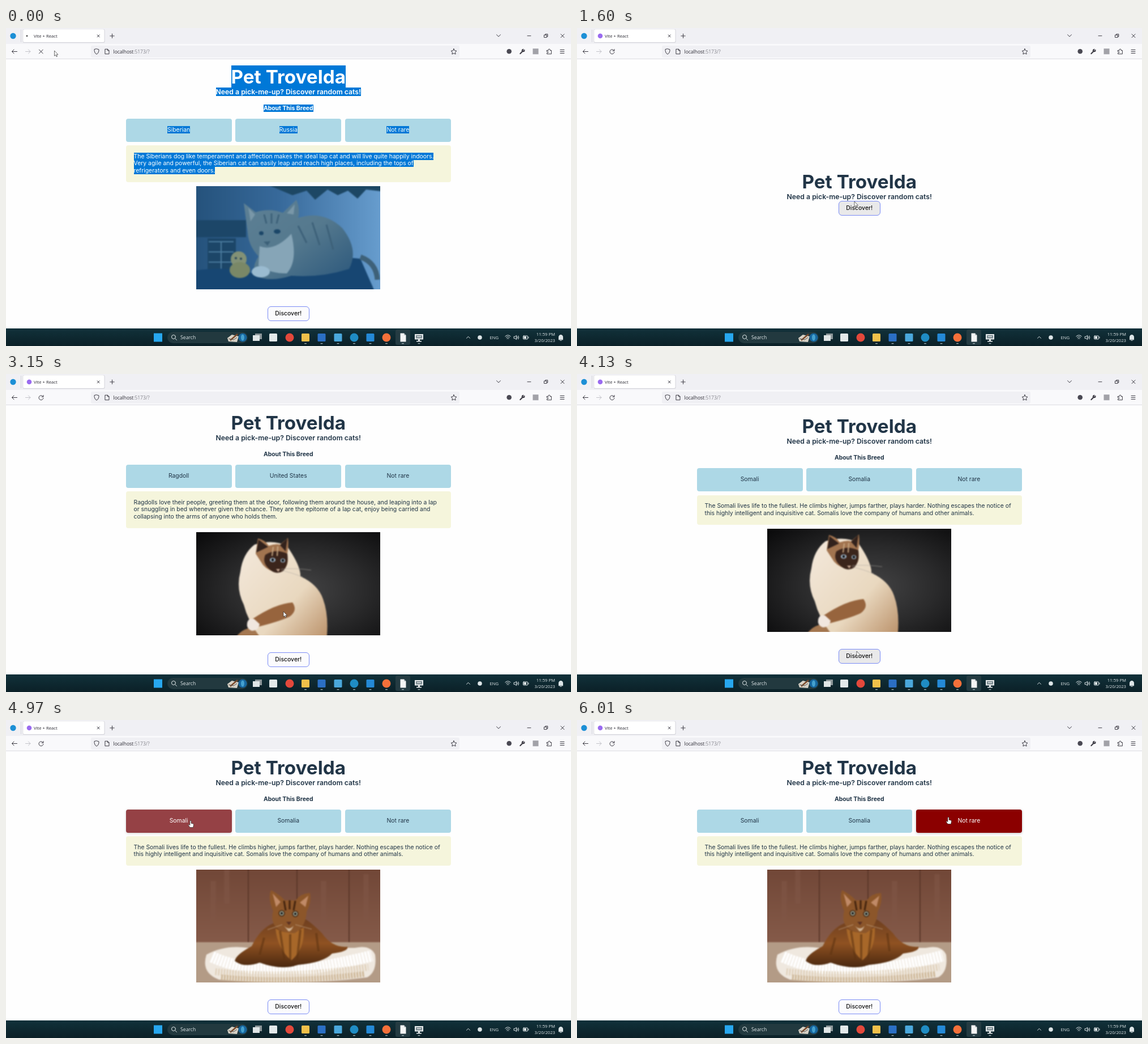
An HTML page that plays this animation: 998 px wide and 561 px high, repeating every 6070 ms.

```html
<!DOCTYPE html>
<html lang="en">
<head>
<meta charset="utf-8">
<title>Breed cards</title>
<style>
html, body { margin: 0; width: 998px; height: 561px; overflow: hidden; background: #fefefe; }
body { position: relative; font-family: Inter, sans-serif; font-optical-sizing: none; color: #213547; }
.page { position: absolute; left: 211.5px; top: 54px; width: 574.5px; height: 474.6px;
  display: flex; flex-direction: column; justify-content: center; align-items: center; }
.page * { flex: none; box-sizing: border-box; }
h1, h2, h3, p { margin: 0; white-space: nowrap; }
h1 { font-size: 33.28px; line-height: 41px; height: 39px; font-weight: 700; }
h2 { position: relative; font-size: 12.25px; line-height: 15px; height: 15px; font-weight: 600; }
h3 { font-size: 10.4px; line-height: 13px; margin: 15px 0 12.4px; font-weight: 700; }
.tiles { display: flex; gap: 6.4px; width: 100%; height: 40.4px; }
.page .tile { --h: 0; flex: 1; border-radius: 4px; text-align: center; font-size: 10.4px; line-height: 40.4px;
  background: color-mix(in srgb, #8b0000 calc(var(--h) * 100%), #add8e6);
  color: color-mix(in srgb, #fff min(100%, var(--h) * 200%), #213547);
  box-shadow: 0 1px 4px rgba(0, 0, 0, calc(var(--h) * .25)); }
.about { width: 100%; margin: 6.7px 0 7px; padding: 13.5px 14px; border-radius: 4px; background: #f5f5dc;
  font-size: 10.43px; line-height: 12.48px; white-space: pre; }
.photo { display: none; width: 325px; overflow: hidden; }
.photo g { filter: blur(.9px); }
.button { --h: 0; width: 73.5px; height: 26px; border: 1px solid #7b8cf5; border-radius: 6px;
  background: color-mix(in srgb, #e9e9ea calc(var(--h) * 100%), #fbfbfd);
  color: #111; font-size: 10.4px; font-weight: 500; line-height: 24px; text-align: center; }
.result ~ .button { margin-top: 29.5px; }
.result { display: contents; }
.home .result { display: none; }
.home .button { margin-top: 0; }
.blank { visibility: hidden; }
.selected span { background: #0078d7; color: #fff; }
[data-photo="siberian"] .siberian, [data-photo="ragdoll"] .ragdoll, [data-photo="somali"] .somali { display: block; }
.screen { position: absolute; left: 0; top: 0; }
.screen text { font-family: "Open Sans", "Noto Sans", sans-serif; font-size: 7.7px; fill: #2b2a33; }
.screen .light text { fill: #dde5e7; }
.line { fill: none; stroke: #3c3b44; stroke-width: 1; stroke-linecap: round; stroke-linejoin: round; }
.light .line { stroke: #dde5e7; }
</style>
</head>
<body>
<main class="page selected" id="page">
  <h1><span>Pet Trovelda</span></h1>
  <h2><span>Need a pick-me-up? Discover random cats!</span></h2>
  <div class="result">
    <h3><span>About This Breed</span></h3>
    <div class="tiles">
      <div class="tile"><span id="breed"></span></div>
      <div class="tile"><span id="origin"></span></div>
      <div class="tile"><span>Not rare</span></div>
    </div>
    <p class="about"><span id="about"></span></p>

    <svg class="photo siberian" width="325" height="182.5" viewBox="0 0 325 182.5">
      <defs>
        <linearGradient id="room"><stop stop-color="#24517a"/><stop offset=".45" stop-color="#37699a"/><stop offset="1" stop-color="#699fd0"/></linearGradient>
        <linearGradient id="grey" x2="1" y2="1"><stop stop-color="#5d8095"/><stop offset=".5" stop-color="#55798e"/><stop offset="1" stop-color="#2c587c"/></linearGradient>
      </defs>
      <g>
        <rect x="-9" y="-9" width="343" height="201" fill="url(#room)"/>
        <path d="M-9 60H88V90H-9ZM20 92H70V150H20Z" fill="#1c4668"/>
        <path d="M22 98H66M22 116H66M22 134H66M44 98V150" stroke="#4b7c9f" stroke-width="2"/>
        <path d="M110 -9H334V10L300 6 285 22 268 8 250 16 232 6 210 24 195 8 170 16Z" fill="#1d4764"/>
        <path d="M-9 150Q60 138 110 158Q210 120 290 128L318 192H-9Z" fill="#174672"/>
        <path d="M290 125Q318 135 320 165" fill="none" stroke="#3e6179" stroke-width="9"/>
        <path d="M84 30L105 46Q130 38 153 47L177 24Q184 42 180 56Q225 42 258 74Q288 112 270 146Q220 162 168 158Q130 170 104 158Q98 142 110 124Q92 104 91 82Z" fill="url(#grey)"/>
        <path d="M112 106Q138 116 168 84Q180 132 160 154Q130 154 110 140Z" fill="#86a5b7"/>
        <path d="M92 38L104 50 96 62ZM174 32L172 50 160 48Z" fill="#7997a8"/>
        <path d="M120 50L124 66M133 48V66M146 50L142 66M180 70L195 100M205 64L218 104M230 68L242 112" stroke="#3d6179" stroke-width="3"/>
        <ellipse cx="143" cy="80" rx="6" ry="4" fill="#1b4668"/><ellipse cx="115" cy="83" rx="4" ry="3.5" fill="#1b4668"/>
        <path d="M119 98L131 97 126 105Z" fill="#3b6078"/>
        <ellipse cx="114" cy="151" rx="16" ry="10" fill="#9abbd0"/>
        <circle cx="75" cy="129" r="14" fill="#829176"/><ellipse cx="77" cy="148" rx="18" ry="14" fill="#7a8867"/>
        <circle cx="70" cy="127" r="2" fill="#26445a"/><circle cx="79" cy="128" r="2" fill="#26445a"/>
      </g>
    </svg>

    <svg class="photo ragdoll" width="325" height="182.5" viewBox="0 0 325 182.5">
      <defs>
        <radialGradient id="studio" cx=".55" cy=".55" r=".7"><stop stop-color="#444445"/><stop offset=".5" stop-color="#2a2a2b"/><stop offset="1" stop-color="#0b0b0c"/></radialGradient>
        <linearGradient id="cream" x2="1" y2="1"><stop stop-color="#f4e9dc"/><stop offset=".6" stop-color="#e9d8bf"/><stop offset="1" stop-color="#b98f67"/></linearGradient>
      </defs>
      <g>
        <rect x="-9" y="-9" width="343" height="201" fill="url(#studio)"/>
        <path d="M66 192Q80 165 112 168L140 192Z" fill="#a47750"/>
        <path d="M103 22Q135 12 160 24Q185 60 184 78Q215 92 224 118Q235 148 230 192H118Q92 160 84 128Q70 100 78 70Q82 38 103 22Z" fill="url(#cream)"/>
        <path d="M105 38L109 11Q122 14 128 24Q140 20 148 22L162 10Q164 26 160 42Q166 58 150 70Q130 72 118 58Z" fill="#a2744f"/>
        <path d="M106 36L110 13 127 26ZM148 23L161 11 158 34Z" fill="#32221c"/>
        <path d="M122 40Q140 28 161 38Q164 58 153 69Q140 76 129 65Q116 54 122 40Z" fill="#3b251c"/>
        <path d="M136 26L134 42M144 25L143 42" stroke="#c9a984" stroke-width="2"/>
        <ellipse cx="135" cy="49" rx="5" ry="3.8" fill="#a5bdd2"/><ellipse cx="153" cy="50" rx="4" ry="3.6" fill="#a5bdd2"/>
        <circle cx="135" cy="49" r="2.4" fill="#111"/><circle cx="153" cy="50" r="2.4" fill="#111"/>
        <path d="M141 65H148L145 70Z" fill="#c5a590"/>
        <path d="M150 65Q175 63 203 67M150 67Q170 72 188 79" fill="none" stroke="#aaa49e" stroke-width=".6"/>
        <path d="M170 124Q140 126 98 154L105 168Q146 158 165 149Q180 138 170 124Z" fill="#97643d"/>
        <path d="M90 160Q92 151 102 153L112 162Q110 174 98 174Q88 170 90 160Z" fill="#f1e7df"/>
      </g>
    </svg>

    <svg class="photo somali" width="325" height="198.8" viewBox="0 0 325 198.8">
      <defs>
        <linearGradient id="wood" y2="1" x2="0"><stop stop-color="#704636"/><stop offset="1" stop-color="#916654"/></linearGradient>
        <linearGradient id="rust" y2="1" x2="0"><stop stop-color="#6f4020"/><stop offset=".5" stop-color="#8f5222"/><stop offset="1" stop-color="#4a280f"/></linearGradient>
      </defs>
      <g>
        <rect x="-9" y="-9" width="343" height="217" fill="url(#wood)"/>
        <path d="M92 -9V130M178 -9V130M270 -9V130" stroke="#5b3729" stroke-width="2"/>
        <path d="M30 20V90M54 0V60M225 20V100M300 8V90" stroke="#805646" stroke-width="9" opacity=".6"/>
        <path d="M-9 128H334V208H-9Z" fill="#b39b86"/>
        <path d="M18 150Q50 132 92 138H280Q308 132 316 150Q320 180 302 190Q180 206 40 194Q8 182 18 150Z" fill="#efe8df"/>
        <path d="M28 154Q60 168 98 174H208Q270 162 310 152" fill="none" stroke="#fff" stroke-width="20" stroke-dasharray="4 1.5"/>
        <path d="M34 180Q160 194 304 172" fill="none" stroke="#dccbb2" stroke-width="12" stroke-dasharray="2 3"/>
        <path d="M44 190Q160 202 298 184" fill="none" stroke="#cdb696" stroke-width="10" stroke-dasharray="3 2"/>
        <path d="M135 95Q112 105 98 135Q70 150 68 161Q84 174 112 164Q150 178 180 168Q225 164 240 148Q270 144 267 136Q240 138 222 112Q204 94 194 88Z" fill="url(#rust)"/>
        <path d="M140 104Q164 118 190 102Q192 140 168 160Q144 140 140 104Z" fill="#a76729"/>
        <path d="M132 36Q150 46 156 54H176Q184 42 201 41Q204 58 195 74Q194 100 174 112Q150 112 138 98Q132 86 136 73Q126 52 132 36Z" fill="#8c562a"/>
        <path d="M135 42L149 57 141 66ZM198 46L193 66 183 58Z" fill="#c08a67"/>
        <path d="M155 55L158 72M165 54V70M175 55L172 72" stroke="#42230e" stroke-width="3"/>
        <path d="M148 108L156 160M166 114V164M184 106L178 160M120 120L112 150M212 112L216 144" stroke="#5f3412" stroke-width="4" opacity=".6"/>
        <circle cx="151" cy="77" r="5.5" fill="#3a2211"/><circle cx="175" cy="78" r="5.5" fill="#3a2211"/>
        <circle cx="151" cy="77" r="3.7" fill="#b8c5b3"/><circle cx="175" cy="78" r="3.7" fill="#b8c5b3"/>
        <circle cx="151" cy="77" r="2.2" fill="#111"/><circle cx="175" cy="78" r="2.2" fill="#111"/>
        <path d="M159 92H168L164 98Z" fill="#593022"/>
        <path d="M155 99Q164 108 172 99Q168 109 163 109Z" fill="#cdb294"/>
        <path d="M152 97L126 106M175 97L204 105" stroke="#d9c3aa" stroke-width=".6"/>
      </g>
    </svg>
  </div>
  <div class="button" id="button">Discover!</div>
</main>

<svg class="screen" width="998" height="561" viewBox="0 0 998 561">
  <defs>
    <linearGradient id="bar" x2="0" y2="1"><stop stop-color="#11313a"/><stop offset="1" stop-color="#0b2027"/></linearGradient>
  </defs>
  <!-- browser -->
  <rect width="998" height="28" fill="#f0f0f4"/>
  <rect y="28" width="998" height="26" fill="#f9f9fb"/>
  <path d="M0 54.5H998" stroke="#dcdce2"/>
  <path d="M26.5 3V25" stroke="#d6d6dc"/>
  <circle cx="12.5" cy="14" r="5.2" fill="#1c8fd6"/>
  <rect x="29.5" y="2" width="145" height="24" rx="2.5" fill="#d2d2d8"/>
  <rect x="30.2" y="2.3" width="143.4" height="22.8" rx="2.2" fill="#fff"/>
  <circle id="spinner" cy="14" r="1.3" fill="#333"/>
  <circle id="favicon" cx="41" cy="14" r="4.3" fill="#9a6bf0"/>
  <text x="49" y="17">Vite + React</text>
  <g class="line">
    <path d="M161.2 12L165.2 16M165.2 12L161.2 16M187.5 10.3V17.7M183.8 14H191.2M866.5 11.8L870 15.2 873.5 11.8M921 13.8H927M980 10.8L986 16.8M986 10.8L980 16.8"/>
    <rect x="950.8" y="12.3" width="4.3" height="4.3"/><path d="M952.5 12V10.8H956.8V15.2H955.5"/>
    <path d="M19.5 41.5H10.5M14 38L10.5 41.5 14 45"/>
    <path d="M34.5 41.5H43M39.5 38L43 41.5 39.5 45" stroke="#c3c3c9"/>
    <path id="stop" d="M58.5 38.2L65.2 45M65.2 38.2L58.5 45"/>
    <path id="reload" d="M65.4 39.7A4 4 0 1 0 66 42.5M66 37.5V40.3H63.2"/>
  </g>
  <rect x="150" y="31" width="651" height="21" rx="3" fill="#f0f0f4"/>
  <g class="line">
    <path d="M160 36.8L164 38Q164.3 44 160 46.3Q155.7 44 156 38Z"/>
    <path d="M175.3 37.3H179.5L182 39.8V45.8H175.3ZM179.5 37.3V39.8H182"/>
    <path d="M791 36.7L792.5 39.9 796 40.4 793.5 42.8 794.1 46.2 791 44.6 787.9 46.2 788.5 42.8 786 40.4 789.5 39.9Z"/>
    <path d="M908.3 45.3L912 41.5" stroke-width="2"/>
    <path d="M915.7 38.5L913.8 40.3 912.6 39.2 914.3 37.3Q911 37 911 40.5Q912.5 43 915.5 41.5Z" fill="#3c3b44"/>
    <path d="M955.5 39.5H958V38Q959.5 36 961 38V39.5H963.3V45.8H955.5V43.8Q958.3 43.5 958.3 42.6T955.5 41.4Z"/>
    <path d="M979 38.5H986M979 41.5H986M979 44.5H986"/>
  </g>
  <text x="189.5" y="45" style="font-size:8.5px">localhost<tspan fill="#85858d">:5173/?</tspan></text>
  <circle cx="888.7" cy="41.3" r="4.3" fill="#4a4953"/>
  <rect x="930.5" y="36.3" width="10" height="10" fill="#a2a2a8"/>

  <!-- taskbar -->
  <g class="light">
    <rect y="530" width="998" height="31" fill="url(#bar)"/>
    <rect x="261" y="538.5" width="15" height="15" fill="#27a7ef"/>
    <rect x="285" y="536" width="142" height="20" rx="10" fill="#22393f"/>
    <circle class="line" cx="296" cy="545" r="3.5"/><path class="line" d="M298.7 547.7L301.5 550.5"/>
    <text x="308" y="549" style="font-size:8.7px">Search</text>
    <path d="M391 547L399 541 411 544 408 554 393 553Z" fill="#d8d2c6"/>
    <path d="M396 551L409 540" stroke="#7a4a2c" stroke-width="2.5"/>
    <path d="M393 548L402 550 408 546" fill="none" stroke="#5b5b58"/>
    <circle cx="418" cy="546" r="7.5" fill="#17679f"/><ellipse cx="418" cy="546" rx="3" ry="5.5" fill="#45a1cf"/>
    <rect x="440" y="539" width="12" height="10" fill="#8d979a"/><rect x="436" y="542" width="12" height="10" fill="#dfe5e6"/>
    <rect x="688" y="532" width="26" height="27" rx="3" fill="#243b42"/>
    <g id="apps"></g>
    <path d="M696.5 538.5H703L706.5 542V553.5H696.5Z" fill="#f5f5f5"/><path d="M703 538.5V542H706.5Z" fill="#aab3b6"/>
    <path d="M722 540H737V549.5H722ZM728 549.5H731V552H728ZM725 552H734V553.5H725Z" fill="#e6eaeb"/>
    <path d="M724 542H735V547.5H724Z" fill="#7b8b91"/><path d="M726 544.5H733" stroke="#fff"/>
    <path class="line" d="M813.5 547.3L816.5 544.3 819.5 547.3"/>
    <circle cx="837" cy="546" r="3.8" fill="#dde5e7"/>
    <text x="854.5" y="548.8">ENG</text>
    <g class="line">
      <path d="M881.8 544Q886.5 539.5 891.2 544M883.5 546Q886.5 543.2 889.5 546M885 548Q886.5 546.7 888 548"/>
      <path d="M897.5 544.3H899.3L901.5 542.3V549.7L899.3 547.7H897.5ZM903.2 544.5Q904.5 546 903.2 547.5M904.8 543Q907 546 904.8 549"/>
      <rect x="913.5" y="543" width="8" height="6" rx="1"/><path d="M923 545V547"/>
      <path d="M976.5 549.5V544.5Q977 541.5 980 541.5T983.5 544.5V549.5ZM979 551.2H981" fill="#dde5e7"/>
    </g>
    <rect x="914.5" y="544" width="4.5" height="4" fill="#dde5e7"/>
    <g text-anchor="end"><text x="970" y="542.8">11:59 PM</text><text x="970" y="553.8">3/20/2023</text></g>
  </g>

  <g id="cursor">
    <path id="arrow" d="M0 0V9.3L2.1 7.4 3.6 10.7 5 10.1 3.6 6.9H6.5Z" fill="#fff" stroke="#222" stroke-width=".65"/>
    <path id="beam" d="M-1.7 -4H1.7M0 -4V4M-1.7 4H1.7" fill="none" stroke="#444" stroke-width=".8"/>
    <path id="hand" d="M-1.1 1A1.1 1.1 0 0 1 1.1 1V4.8L4.5 5.5Q5.6 6 5.4 7.5L4.6 12H-1L-3.6 8.4Q-4 7 -2.6 7L-1.1 8.2Z" fill="#fff" stroke="#222" stroke-width=".65"/>
  </g>
</svg>

<script>
const LOOP = 6070, FADE = 300;
const $ = id => document.getElementById(id);
const tiles = [...document.querySelectorAll('.tile')];
const clamp = v => Math.min(1, Math.max(0, v));

// taskbar apps: x, colour, round
[[472, '#e3e9ea'], [501, '#e2483b', 1], [529, '#f0c04a'], [557.5, '#2b6fc4'], [586.5, '#4aa8dc'],
 [615, '#1f8cc4', 1], [643.5, '#2489d6'], [672, '#f4703a', 1]].forEach(([x, fill, round]) => {
  $('apps').innerHTML += round
    ? `<circle cx="${x}" cy="546" r="7.5" fill="${fill}"/>`
    : `<rect x="${x - 7}" y="539" width="14" height="14" rx="1.5" fill="${fill}"/>`;
});
[529, 557.5, 586.5, 615, 643.5, 672, 701, 729.5].forEach(x => {
  $('apps').innerHTML += `<rect x="${x - 2}" y="556" width="4" height="1.3" rx=".6" fill="#a9b7ba"/>`;
});

const siberian = ['Siberian', 'Russia', `The Siberians dog like temperament and affection makes the ideal lap cat and will live quite happily indoors.
Very agile and powerful, the Siberian cat can easily leap and reach high places, including the tops of
refrigerators and even doors.`];
const ragdoll = ['Ragdoll', 'United States', `Ragdolls love their people, greeting them at the door, following them around the house, and leaping into a lap
or snuggling in bed whenever given the chance. They are the epitome of a lap cat, enjoy being carried and
collapsing into the arms of anyone who holds them.`];
const somali = ['Somali', 'Somalia', `The Somali lives life to the fullest. He climbs higher, jumps farther, plays harder. Nothing escapes the notice of
this highly intelligent and inquisitive cat. Somalis love the company of humans and other animals.`];

// start, page class, cat, photo
const scenes = [
  [0, 'selected', siberian, 'siberian'],
  [390, 'blank', siberian, ''],
  [450, 'home', siberian, ''],
  [2190, '', ragdoll, ''],
  [2470, '', ragdoll, 'ragdoll'],
  [3870, '', somali, 'ragdoll'],
  [4200, '', somali, 'somali'],
];

const updates = [[70, 650, 10], [710, 1200, 8], [1450, 1450, 1], [1600, 1600, 1], [2190, 2260, 2], [2470, 3010, 9],
  [3090, 3670, 10], [3740, 4340, 10], [4400, 4970, 10], [5040, 5600, 9], [5660, 6010, 6]];

// time, x, y
const path = [[0, 85.5, 40], [140, 86, 41], [650, 340, 250], [780, 396, 294], [1200, 484, 304], [1450, 489, 305],
  [1600, 490, 306], [2190, 490, 309], [2470, 490, 309], [3010, 490, 419], [3160, 490, 419], [3350, 431, 268],
  [3670, 494, 497], [4060, 494, 489], [4130, 494, 489], [4340, 463, 430], [4750, 345, 200], [4970, 326, 177.5],
  [5400, 640, 181], [5660, 690, 180], [6010, 656, 171.5], [LOOP, 656, 171.5]];

const hovers = [[4760, 5080], [5100, 5350], [5360, LOOP]];

function snap(t) {
  let last = 0;
  for (const [a, b, n] of updates) {
    if (t < a) break;
    const step = n > 1 ? (b - a) / (n - 1) : 1;
    last = a + step * Math.min(n - 1, Math.floor((t - a) / step + .01));
  }
  return last;
}

function cursorAt(t) {
  const i = Math.max(1, path.findIndex(p => p[0] >= t));
  const [a, b] = [path[i - 1], path[i]], k = (t - a[0]) / (b[0] - a[0]);
  return [a[1] + (b[1] - a[1]) * k, a[2] + (b[2] - a[2]) * k];
}

const heat = (t, from, to) => clamp(clamp((t - from) / FADE) - clamp((t - to) / FADE));
const show = (id, on) => $(id).style.display = on ? '' : 'none';

let current;
function setScene(scene) {
  if (scene === current) return;
  current = scene;
  const [, mode, cat, photo] = scene;
  $('page').className = 'page ' + mode;
  $('page').dataset.photo = photo;
  ['breed', 'origin', 'about'].forEach((id, i) => $(id).textContent = cat[i]);
}

function render(now) {
  const t = snap(now);
  setScene(scenes.findLast(s => s[0] <= t));
  hovers.forEach(([from, to], i) => tiles[i].style.setProperty('--h', heat(t, from, to)));
  $('button').style.setProperty('--h', t < 2190 ? heat(t, 1000, LOOP) : heat(t, 3500, 4200));

  const loading = t < 580;
  show('spinner', loading);
  show('favicon', !loading);
  show('stop', loading);
  show('reload', !loading);
  $('spinner').setAttribute('cx', 41 - 4 * Math.cos(t / 140));
  $('reload').style.stroke = t < 1130 ? '#b4b4ba' : '';

  const [x, y] = cursorAt(t);
  const hand = t >= 4760, beam = t > 700 && t < 900;
  show('hand', hand);
  show('beam', beam);
  show('arrow', !hand && !beam);
  $('cursor').setAttribute('transform', `translate(${x} ${y})`);
}

const start = performance.now();
function tick() {
  render((performance.now() - start) % LOOP);
  requestAnimationFrame(tick);
}
tick();
</script>
</body>
</html>
```
